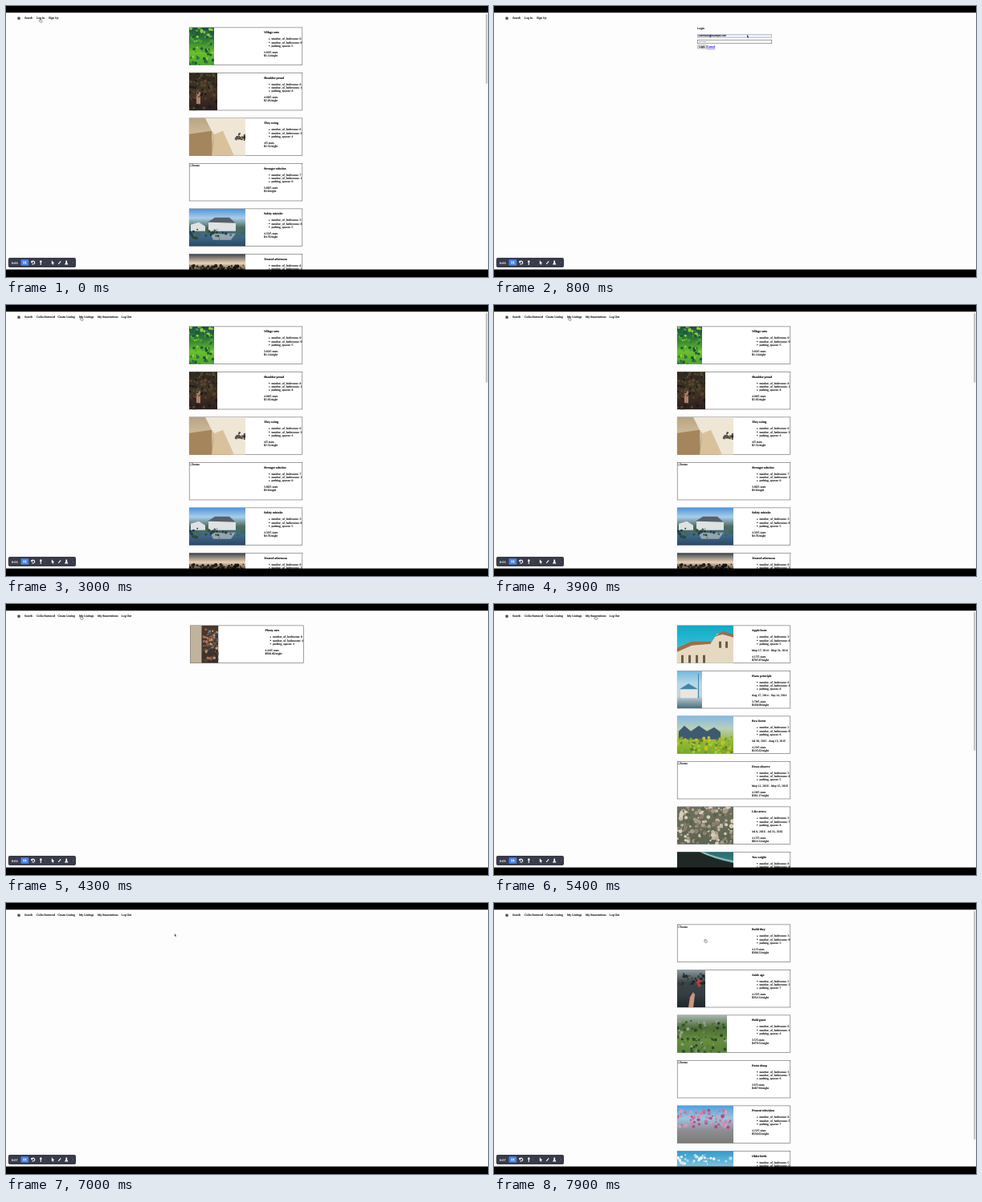
Write an HTML page that moves like this. It is 600x338 px and loops after 8000 ms.

```html
<!DOCTYPE html>
<html lang="en">
<head>
<meta charset="utf-8">
<title>Listings walkthrough</title>
<style>
  html, body { margin: 0; width: 100%; height: 100%; overflow: hidden; background: #000; }
  #stage { display: block; width: 600px; height: 338px; }
  text { font: 3.75px "Liberation Serif", "Times New Roman", serif; fill: #000; stroke: #000; stroke-width: .12px; text-rendering: geometricPrecision; }
  .bold { font-weight: 700; }
  .field { font: 3.1px "Liberation Sans", Arial, sans-serif; }
  .link { fill: #00e; stroke: #00e; text-decoration: underline; }
  .clock { font: 700 3.9px "Liberation Sans", Arial, sans-serif; fill: #fff; stroke: none; animation: tick 8s step-end infinite; }
  .show { animation: 8s step-end infinite; }
  #home { animation-name: home; }
  #login { animation-name: login; }
  #mine { animation-name: mine; }
  #trips { animation-name: trips; }
  #found { animation-name: found; }
  #guest { animation-name: guest; }
  #member { animation-name: member; }
  #hand { animation-name: hand; }
  #arrow { animation-name: arrow; }
  #pointer { animation: move 8s ease-in-out infinite; }

  @keyframes tick { 0% { visibility: visible } 12.5%, 100% { visibility: hidden } }
  @keyframes home { 0%, 18.75% { visibility: visible } 5%, 50%, 100% { visibility: hidden } }
  @keyframes login { 0%, 18.75%, 100% { visibility: hidden } 5% { visibility: visible } }
  @keyframes mine { 0%, 65%, 100% { visibility: hidden } 50% { visibility: visible } }
  @keyframes trips { 0%, 82.5%, 100% { visibility: hidden } 65% { visibility: visible } }
  @keyframes found { 0% { visibility: hidden } 93.75%, 100% { visibility: visible } }
  @keyframes guest { 0% { visibility: visible } 18.75%, 100% { visibility: hidden } }
  @keyframes member { 0% { visibility: hidden } 18.75%, 100% { visibility: visible } }
  @keyframes hand { 0%, 28.5%, 90% { visibility: visible } 5%, 71%, 100% { visibility: hidden } }
  @keyframes arrow { 0%, 28.5%, 90%, 100% { visibility: hidden } 5%, 71% { visibility: visible } }
  @keyframes move {
    0%, 4.5% { transform: translate(42.3px, 16px) }
    9.5%, 11.5% { transform: translate(315px, 36px) }
    14.5%, 18% { transform: translate(259px, 50px); animation-timing-function: ease-in }
    25% { transform: translate(142px, 26.5px); animation-timing-function: ease-out }
    30%, 58.75% { transform: translate(93.3px, 15px) }
    62.5%, 70% { transform: translate(126px, 15px) }
    75.5%, 82.5% { transform: translate(32.5px, 16px) }
    90%, 100% { transform: translate(262.6px, 45px) }
  }
</style>
</head>
<body>
<svg id="stage" viewBox="0 0 600 338"></svg>
<script>
const rect = (x, y, w, h, fill, extra = '') => `<rect x="${x}" y="${y}" width="${w}" height="${h}" fill="${fill}" ${extra}/>`;
const path = (d, fill, extra = '') => `<path d="${d}" fill="${fill}" ${extra}/>`;
const disc = (x, y, r, fill) => `<circle cx="${x}" cy="${y}" r="${r}" fill="${fill}"/>`;
const text = (x, y, s, cls = '') => `<text x="${x}" y="${y}" class="${cls}">${s}</text>`;
const times = (n, fn) => Array.from({ length: n }, (_, i) => fn(i)).join('');
const group = (id, body) => `<g id="${id}" class="show">${body}</g>`;

const cardH = 47, pitch = 56.5, lineH = 4.22;

// Each photo: width, tones from top to bottom, flat shapes, then flecks between two heights.
const photos = {
  garden: { w: 31, tones: '#1d4a4c #2f7a35 #6cc02c #4aa52c', flecks: '#4a9c38 #1c5a35 #8fd034 #2d7445', band: [0, 1] },
  fence: { w: 35, tones: '#2b271e #453626 #2d1d20', shapes: { '#b08069': 'M9 24h5v15h-5z' }, flecks: '#4b4a2d #1c1b17 #5f432f #2a2420', band: [0, 1] },
  stairs: { w: 70, tones: '#b9a583 #d0bd9c #a58a66', shapes: { '#efe6d6': 'M20 0H70V47H52L28 16Z', '#a5855c': 'M0 20L28 16V47H0Z', '#d9c29b': 'M32 20L42 16L56 47H28Z' }, flecks: '#34312f #5f5a54', band: [.4, .6], from: 58, n: 14 },
  lake: { w: 70, tones: '#4f94d8 #a9cdea #4d6c5c #3c688c #2c4760', shapes: { '#dfe2e2': 'M24 17L32 11H50L58 18V28H24ZM2 20L12 17L20 22V28H2Z', '#56606c': 'M23 17L32 11H50L58 18Z', '#93a5b0': 'M26 31H58L52 39H30Z' }, flecks: '#2f4a35 #48663f #26404c', band: [.55, .8], n: 30 },
  dusk: { w: 70, tones: '#39424b #ecd2b6 #17130f #111 #111', flecks: '#1d1c18 #302a20 #14110e', band: [.3, .5] },
  shelves: { w: 35, tones: '#4a382c #3a2f28', flecks: '#765c46 #b69a7d #34506c #4f3e32 #b86b52', band: [.1, .95], shapes: { '#c0b49e': 'M0 0H14V47H0Z' }, from: 16 },
  villa: { w: 70, tones: '#12a9c6 #2fbcd2 #7fd3dc', shapes: { '#e6d9c2': 'M0 30L18 22L42 22L50 10L70 14V47H0Z', '#a06c4c': 'M0 28L18 20L42 20V23L18 25L0 33ZM46 14L57 7L70 11V15L57 11Z', '#6f5a4b': 'M5 37h3v10h-3zm9 0h3v10h-3zm9 0h3v10h-3zm9 0h3v10h-3zM52 20h3v8h-3zm8 0h3v8h-3z' } },
  harbour: { w: 31, tones: '#6fb8de #b4d8e6 #c8d4d6 #466f80', shapes: { '#e8e6e0': 'M4 23L14 17L25 23V34H4Z', '#3f86ab': 'M3 23L14 16L26 23ZM26 4h1v30h-1z' } },
  lawn: { w: 70, tones: '#84b9e4 #b9cfb8 #92bb34 #76ab28', shapes: { '#3d5a70': 'M2 29V19L9 12L17 19L27 12L37 19L46 14L54 20V29Z' }, flecks: '#d8b826 #7fa52a #a9cc35 #5f7f28', band: [.55, 1] },
  suburb: { w: 70, tones: '#6f705f #5c6450', flecks: '#c4b7a4 #8d7d70 #d8cdbb #58654a #a99a88', band: [0, 1], n: 200, size: 2 },
  coast: { w: 70, tones: '#2b6a70 #3f9296 #256', shapes: { '#202826': 'M0 0H28Q44 8 70 14V47H0Z', '#8fbdbb': 'M28 0Q44 8 70 13V11Q46 6 33 0Z' } },
  road: { w: 35, tones: '#8f9ca3 #3c4448 #353c42 #20272a', shapes: { '#b94038': 'M23 14L30 10L32 18L27 22Z', '#c99784': 'M14 47L16 34L20 28L22 31L20 47Z' }, flecks: '#29312f #414642 #1d2629', band: [.1, .4], n: 30 },
  estate: { w: 62, tones: '#a9b7b3 #4d6e36 #668d3d #55803a', flecks: '#344f2a #58733a #9b9c92 #2a4527', band: [.15, 1] },
  blossom: { w: 70, tones: '#4f9fdc #9bc5df #8f8c92 #787c76', flecks: '#cc6e9a #e39abc #a84e7e #d781a8', band: [.1, .6], n: 90 },
  skyline: { w: 70, tones: '#309acb #8fcbe2 #587f8e', flecks: '#d6e9ef #b5d9e8 #eef5f6', band: [.1, .35], n: 30 }
};

function random(seed) {
  return () => (seed = seed * 16807 % 2147483647) / 2147483647;
}

function photo(name, x, y) {
  const { w, tones, shapes = {}, flecks, band, from = 0, n = 90, size = 1.6 } = photos[name];
  const stops = tones.split(' ').map((c, i, all) => `<stop offset="${i / (all.length - 1)}" stop-color="${c}"/>`).join('');
  let out = `<linearGradient id="${name}" x2="0" y2="1">${stops}</linearGradient>` + rect(0, 0, w, cardH, `url(#${name})`);
  for (const fill in shapes) out += path(shapes[fill], fill);
  if (flecks) {
    const fills = flecks.split(' '), rnd = random(w * 7919 + n);
    out += times(n, i => disc(from + rnd() * (w - from), cardH * (band[0] + rnd() * (band[1] - band[0])), size * (.4 + rnd()), fills[i % fills.length]));
  }
  return `<svg x="${x}" y="${y}" width="${w}" height="${cardH}">${out}</svg>`;
}

const broken = (x, y) => rect(x + .6, y + .8, 2.8, 3, '#e8eff3', 'stroke="#777" stroke-width=".4"') +
  path(`M${x + .8} ${y + 3.6}l1.2 -1.4l1.2 1.4z`, '#4d9b52') + text(x + 4.2, y + 3.8, 'house');

const rooms = ['number_of_bedrooms', 'number_of_bathrooms', 'parking_spaces'];

function card(x, y, entry) {
  const [pic, title, counts, stars, price, dates] = entry.split(' | ');
  const left = x + 93, end = y + 32 + (dates ? 8 : 0);
  return rect(x + .2, y + .2, 140.6, cardH - .4, '#fff', 'stroke="#555" stroke-width=".55"') +
    (photos[pic] ? photo(pic, x, y) : broken(x, y)) +
    text(left, y + 7.6, title, 'bold') +
    counts.split(' ').map((n, i) => {
      const ly = y + 15.6 + i * lineH;
      return disc(left + 6.8, ly - 1.1, .65, '#000') + text(left + 9.4, ly, `${rooms[i]}: ${n}`);
    }).join('') +
    (dates ? text(left, y + 32, dates) : '') +
    text(left, end, `${stars}/5 stars`) + text(left, end + lineH, `$${price}/night`);
}

const list = (cards, thumb) => cards.map((c, i) => card(228, 26.7 + i * pitch, c)).join('') +
  rect(596.4, 8, 3.6, 321, '#fafafa') + rect(597.2, 10, 2.1, thumb, '#c1c1c1', 'rx="1"');

const homes = [
  'garden | Village onto | 0 9 5 | 3.83 | 1.11',
  'fence | Shoulder proud | 8 1 8 | 4.09 | 2.05',
  'stairs | They swing | 6 3 4 | 4 | 2.51',
  'none | Stronger solution | 7 1 0 | 3.86 | 3.6',
  'lake | Safety mistake | 3 8 5 | 4.33 | 4.76',
  'dusk | Treated afternoon | 8 2 4 | 4.1 | 5.2'
];
const stays = [
  'villa | Apple burn | 3 8 5 | 4.17 | 797.87 | May 17, 2014 - May 31, 2014',
  'harbour | Piano principle | 6 4 8 | 3.78 | 168.69 | Aug 17, 2014 - Sep 14, 2014',
  'lawn | Bow forest | 2 9 6 | 4.23 | 135.62 | Jul 30, 2015 - Aug 15, 2015',
  'none | Down observe | 3 8 5 | 4.29 | 361.17 | May 11, 2016 - May 15, 2016',
  'suburb | Like arrow | 3 7 8 | 4.17 | 824.31 | Jul 8, 2016 - Jul 31, 2016',
  'coast | You weight | 8 8 4 | 4.2 | 210.4'
];
const results = [
  'none | Build they | 3 9 5 | 4.1 | 308.22',
  'road | Aside age | 2 2 7 | 4.25 | 354.31',
  'estate | Hold guest | 6 4 4 | 3.5 | 479.52',
  'none | Extra sheep | 3 7 6 | 3.6 | 487.94',
  'blossom | Present television | 8 5 7 | 4.22 | 530.62',
  'skyline | Older birth | 5 0 6 | 4.3 | 544.1'
];

const form = text(253, 29.3, 'Login') +
  rect(253.3, 35.2, 92.5, 4.3, '#e8f0fe', 'stroke="#767676" stroke-width=".4"') +
  text(254.6, 38.4, 'colinharw@example.com', 'field') +
  rect(253.3, 42.4, 92.5, 4.4, '#fff', 'stroke="#444" stroke-width=".5"') +
  times(8, i => disc(255.3 + i * 1.2, 44.6, .45, '#222')) +
  rect(253.4, 48.8, 11, 4.2, '#efefef', 'rx=".6" stroke="#555" stroke-width=".4"') +
  text(255, 52, 'Login', 'field') + text(264.8, 52, 'Cancel', 'link');

const white = 'stroke="#fff" stroke-width="1.1"';
const recorder = rect(2.8, 314, 84.2, 12, '#383b49', 'rx="2"') +
  times(8, i => `<text x="6.8" y="321.5" class="clock" style="animation-delay:${i - 8}s">0:0${i}</text>`) +
  rect(18.5, 316.2, 9.8, 7.6, '#4c83ea', 'rx="1.2"') + path('M22.3 318.4v3.2M24.5 318.4v3.2', 'none', white) +
  path('M32 319a2 2 0 1 1 .4 2.6M31.8 318v1.7h1.7', 'none', white) +
  rect(42.2, 317.2, 2.2, 3.6, '#fff', 'rx="1.1"') + path('M43.3 321v2', 'none', white) +
  path('M56.8 317.3l3.4 3.5l-1.6 .2l.7 1.6l-.8 .3l-.7 -1.6l-1 .9z', '#fff') +
  path('M65.2 321.8l3 -3.4', 'none', white) +
  path('M74.4 317.5h1.6l.2 2.8l1.2 2.1h-4.4l1.2 -2.1z', '#fff') +
  [48.6, 83.5].map(x => disc(x, 320, .5, '#80848f')).join('');

const pointer = '<g id="pointer">' +
  group('hand', path('M0 0Q.8 -.4 .9 .5V1.7L2.4 2.1Q2.9 2.3 2.7 3L2.3 4.3H.2L-1.1 2.6Q-.9 2 -.1 2.5Z', '#fff', 'stroke="#222" stroke-width=".45"')) +
  group('arrow', path('M0 0v3.3l.8 -.7l.5 1.1l.5 -.2l-.5 -1.1h1z', '#222')) + '</g>';

const link = (x, s) => text(x, 15.8, s);

document.getElementById('stage').innerHTML =
  rect(0, 0, 600, 338, '#fefdfe') +
  group('home', list(homes, 87)) +
  group('login', form) +
  group('mine', card(229.5, 26.7, 'shelves | Plenty rate | 8 4 4 | 4.44 | 930.86')) +
  group('trips', list(stays, 173)) +
  group('found', list(results, 285)) +
  rect(14.4, 13.7, 3.2, 3.2, '#5a4a46') + link(23, 'Search') +
  group('guest', link(38, 'Log In') + link(53, 'Sign Up')) +
  group('member', link(38, 'Colin Harwood') + link(64.5, 'Create Listing') + link(91, 'My Listings') +
    link(114, 'My Reservations') + link(143.5, 'Log Out')) +
  recorder + rect(0, 0, 600, 8.3, '#000') + rect(0, 328.6, 600, 10, '#000') + pointer;
</script>
</body>
</html>
```
